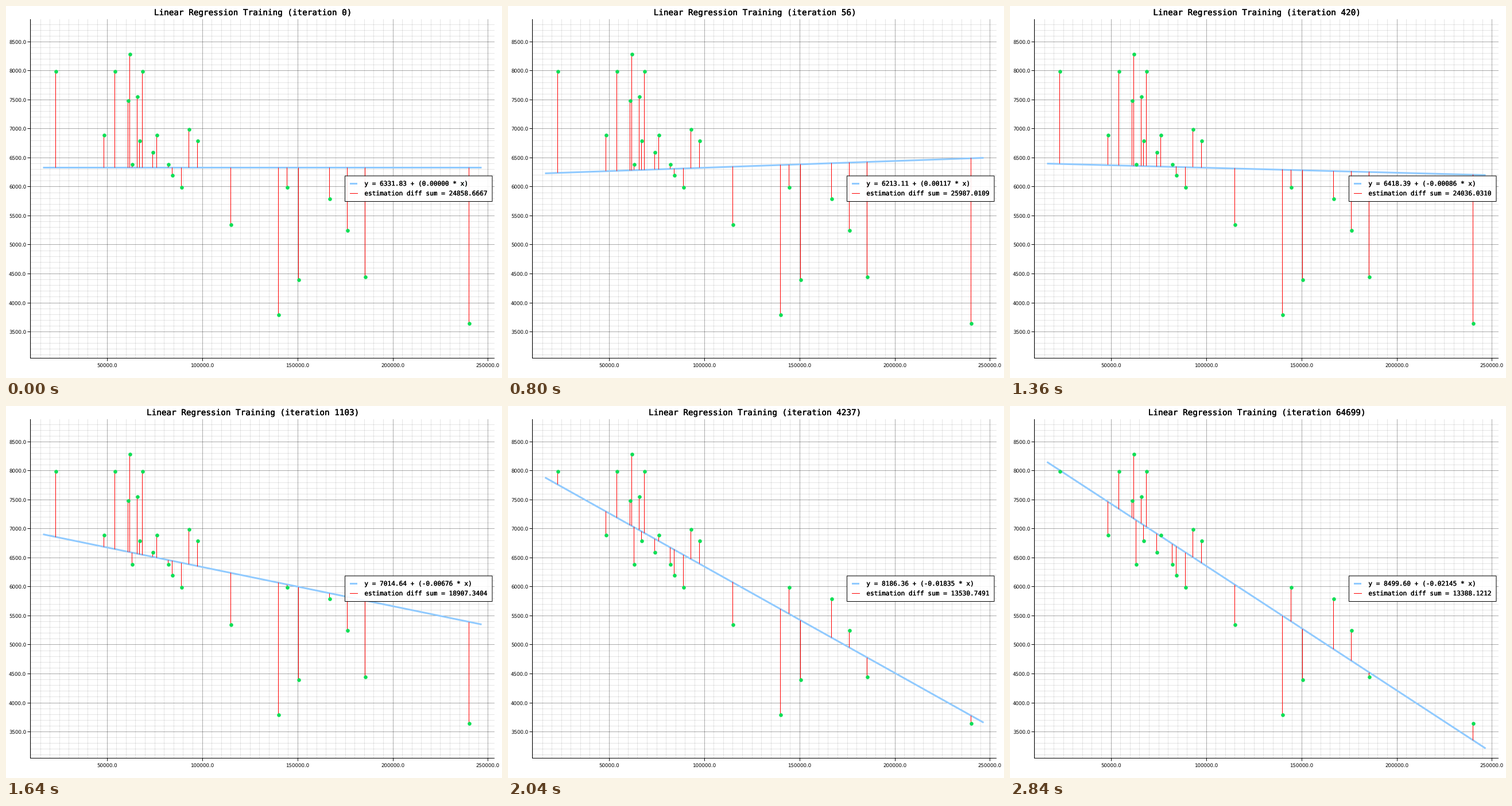
Animation of 864 by 648 pixels, one loop 2880 ms. Source, as a matplotlib script:

```python
import numpy as np
import matplotlib.pyplot as plt
from matplotlib.animation import FuncAnimation
from matplotlib.collections import LineCollection
from matplotlib.patches import Rectangle
from matplotlib.patheffects import withStroke

plt.rcParams["text.hinting"] = "none"

W, H, DPI = 864, 648, 72
FRAMES, INTERVAL = 72, 40
BLUE, RED, GREEN = "#90caff", "#ff0000", "#0fdf55"
MONO = "DejaVu Sans Mono"

# The regression samples: mileage and price
SAMPLES = [
    (22899, 7990), (48235, 6900), (54000, 7990), (60949, 7490),
    (61789, 8290), (63060, 6390), (65674, 7555), (67000, 6800),
    (68500, 7990), (74000, 6600), (76025, 6900), (82029, 6390),
    (84000, 6200), (89000, 5990), (93000, 6990), (97500, 6800),
    (114800, 5350), (139800, 3800), (144500, 5999), (150500, 4400),
    (166800, 5800), (176000, 5250), (185530, 4450), (240000, 3650)]
km, price = np.array(SAMPLES, float).T
span, rise = np.ptp(km), np.ptp(price)

# Plot area in pixels and the data range it covers
LEFT, RIGHT, TOP, BOTTOM = 43, 850, 23, 613
X0, X1 = km.min() - 0.06 * span, km.max() + 0.06 * span
Y0, Y1 = price.min() - 600, price.max() + 600
ends = np.array([km.min() - 0.03 * span, km.max() + 0.03 * span])


def px(x):
    pos = LEFT + (np.asarray(x) - X0) / (X1 - X0) * (RIGHT - LEFT)
    return np.floor(pos) + 0.5


def py(y):
    pos = BOTTOM - (np.asarray(y) - Y0) / (Y1 - Y0) * (BOTTOM - TOP)
    return np.floor(pos) + 0.5


# Gradient descent on min-max scaled data, started at zero
RATE = 0.01
xs, ys = (km - km.min()) / span, (price - price.min()) / rise
design = np.column_stack([np.ones_like(xs), xs])
hessian = design.T @ design / len(xs)
best = np.linalg.solve(hessian, design.T @ ys / len(xs))
decay = np.eye(2) - RATE * hessian


def model(step):
    theta = best - np.linalg.matrix_power(decay, step) @ best
    slope = theta[1] * rise / span
    return price.mean() - slope * km.mean(), slope


# The iteration count grows geometrically between a few key frames
KEY_FRAMES, KEY_STEPS = np.array([
    (0, 0), (11, 14), (20, 56), (34, 420), (41, 1103), (51, 4237),
    (71, 64699)]).T
OFFSET = 7


def iteration(frame):
    level = np.interp(frame, KEY_FRAMES, np.log(KEY_STEPS + OFFSET))
    return int(np.ceil(np.exp(level) - OFFSET - 1e-6))


fig = plt.figure(figsize=(W / DPI, H / DPI), dpi=DPI, facecolor="white")
ax = fig.add_axes([0, 0, 1, 1])
ax.set_xlim(0, W)
ax.set_ylim(H, 0)
ax.axis("off")


def segments(lines, color, width=1, z=1):
    group = LineCollection(lines, colors=color, linewidths=width, zorder=z,
                           capstyle="butt", snap=False)
    ax.add_collection(group, autolim=False)
    return group


def label(x, y, s, size, weight=0, **kw):
    text = ax.text(x, y, s, fontsize=size, color="black", zorder=9, **kw)
    if weight:
        text.set_path_effects([withStroke(linewidth=weight,
                                          foreground="black")])
    return text


def grid(x_ticks, y_ticks, alpha):
    cols = [[(x, TOP), (x, BOTTOM)] for x in px(x_ticks)]
    rows = [[(LEFT, y), (RIGHT + 1, y)] for y in py(y_ticks)]
    segments(cols + rows, (0, 0, 0, alpha))


major_x = np.arange(50000, 250001, 50000)
major_y = np.arange(3500, 8501, 500)
grid(np.arange(10000, 250001, 5000), np.arange(3100, 8801, 100), 0.1)
grid(major_x, major_y, 0.25)

axis_x, axis_y = LEFT - 0.5, BOTTOM + 0.5
frame_lines = [[(axis_x, TOP), (axis_x, BOTTOM + 1)],
               [(axis_x, axis_y), (RIGHT + 1, axis_y)]]
frame_lines += [[(x, axis_y), (x, axis_y + 5)] for x in px(major_x)]
frame_lines += [[(axis_x - 5, y), (axis_x, y)] for y in py(major_y)]
segments(frame_lines, "black", z=2)

for value in major_x:
    label(px(value) - 0.5, 629, f"{value:.1f}", 8.6, family="DejaVu Sans",
          ha="center", va="baseline")
for value in major_y:
    label(35.2, py(value) + 3, f"{value:.1f}", 8.6, family="DejaVu Sans",
          ha="right", va="baseline")

fit, = ax.plot([], [], color=BLUE, lw=3, zorder=3, solid_capstyle="butt",
               snap=False)
errors = segments([], RED, z=4)
ax.plot(px(km), py(price), "o", ms=6.6, mew=0, color=GREEN, zorder=5,
        snap=False)

# Legend
ax.add_patch(Rectangle((590.5, 296), 256.5, 44.5, fc=(1, 1, 1, 0.9),
                       ec="black", lw=1, zorder=6, snap=False))
segments([[(599, 309.5), (612, 309.5)]], BLUE, 3, z=8)
segments([[(599, 326.5), (613, 326.5)]], RED, z=8)

title = label(429.5, 16, "", 14.3, 0.4, family=MONO, ha="center",
              va="baseline")
formula = label(624.3, 313, "", 11.12, 0.3, family=MONO, va="baseline")
total = label(624.3, 330, "", 11.12, 0.3, family=MONO, va="baseline")


def draw(frame):
    step = iteration(frame)
    base, slope = model(step)
    guess = base + slope * km
    fit.set_data(px(ends), py(base + slope * ends))
    errors.set_segments([[(x, a), (x, b)] for x, a, b
                         in zip(px(km), py(price), py(guess))])
    title.set_text(f"Linear Regression Training (iteration {step})")
    formula.set_text(f"y = {base:.2f} + ({slope:.5f} * x)")
    total.set_text(f"estimation diff sum = {np.abs(price - guess).sum():.4f}")
    return fit, errors, title, formula, total


anim = FuncAnimation(fig, draw, frames=FRAMES, interval=INTERVAL,
                     init_func=lambda: draw(0), repeat=True, repeat_delay=0,
                     blit=False)
plt.show()
```
